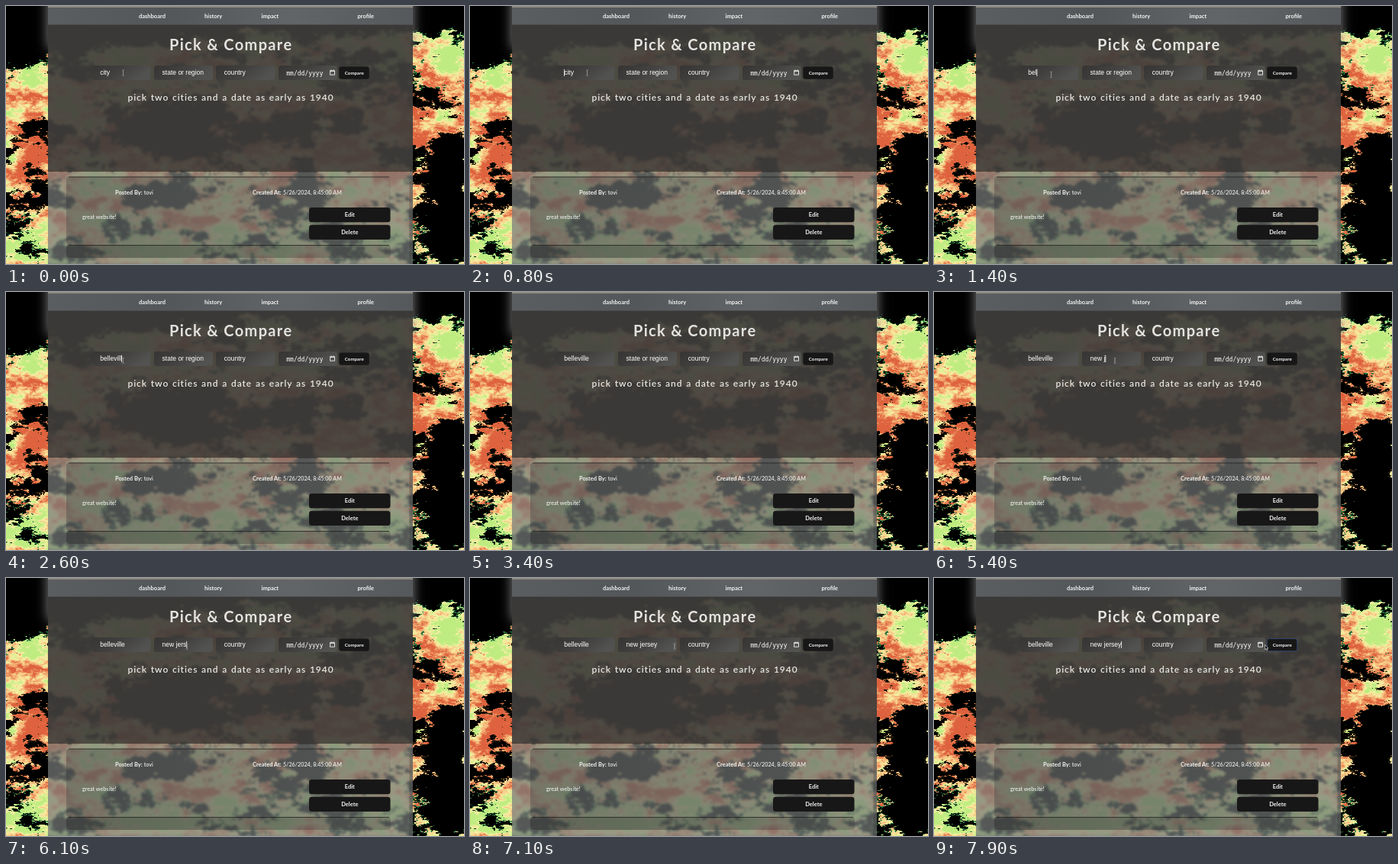
These frames come from a looping animation (600 by 338 pixels, 8000 ms). An HTML page with a canvas:

```html
<!DOCTYPE html>
<html lang="en">
<head>
<meta charset="utf-8">
<title>Pick &amp; Compare</title>
<style>
  html, body { margin: 0; width: 100%; height: 100%; overflow: hidden; background: #000; }
  canvas, svg { position: absolute; left: 0; top: 0; width: 100%; height: 100%; display: block; }
  text { font-family: Lato, sans-serif; font-size: 7.5px; fill: #f3f3f1; white-space: pre; }
  .bold { font-weight: 700; }
  .mid { text-anchor: middle; }
  .title { font-size: 20px; font-weight: 700; letter-spacing: 1.35px; fill: #e4e3df; }
  .lead { font-size: 12px; font-weight: 600; letter-spacing: .95px; word-spacing: .8px; fill: #e9e8e4; }
  .small { font-size: 7.2px; font-weight: 500; }
  .input { font: 8.5px "Liberation Sans", Arial, sans-serif; fill: #fff; }
  .date { font: 8px "DejaVu Sans Mono", monospace; fill: #fff; }
  .field { fill: url(#fieldFill); }
  .button { fill: #181717; }
</style>
</head>
<body>
<canvas id="scene" width="600" height="338"></canvas>
<svg viewBox="0 0 600 338" preserveAspectRatio="none">
  <defs>
    <linearGradient id="fieldFill" x1="0" y1="0" x2="1" y2=".35">
      <stop offset="0" stop-color="#363533"/>
      <stop offset=".5" stop-color="#41403e"/>
      <stop offset="1" stop-color="#525250"/>
    </linearGradient>
  </defs>

  <g class="bold">
    <text x="174" y="16">dashboard</text>
    <text x="260" y="16">history</text>
    <text x="334.5" y="16">impact</text>
    <text x="460.5" y="16">profile</text>
  </g>

  <text class="title mid" x="294.7" y="58.3">Pick &amp; Compare</text>
  <text class="lead mid" x="294.5" y="124.3">pick two cities and a date as early as 1940</text>

  <rect class="field" x="113" y="78" width="76.5" height="19" rx="3"/>
  <rect class="field" x="194" y="78" width="77" height="19" rx="3"/>
  <rect class="field" x="275" y="78" width="77.5" height="19" rx="3"/>
  <rect class="field" x="357" y="78" width="77" height="19" rx="3"/>
  <text class="input" id="city" x="123.2" y="90.4"></text>
  <text class="input" id="state" x="204.6" y="90.4"></text>
  <text class="input" x="285.8" y="90.4">country</text>
  <text class="date" x="367.3" y="90.6">mm/dd/yyyy</text>
  <path d="M424.7 84.8h5.8v5.4h-5.8zM424.2 85.3h6.8M426 83.4v1.4M429.2 83.4v1.4" fill="none" stroke="#f3f3f1" stroke-width=".9"/>
  <rect class="button" id="compare" x="436.3" y="79.5" width="39.5" height="16.2" rx="3"/>
  <text class="bold mid" x="456.3" y="89.7" style="font-size:6.2px">Compare</text>

  <text class="bold" x="143" y="246.6">Posted By:</text>
  <text class="small" x="180.7" y="246.6">tovi</text>
  <text class="bold" x="323" y="246.6">Created At:</text>
  <text class="small" x="363" y="246.6">5/26/2024, 8:45:00 AM</text>
  <text class="small" x="100" y="279">great website!</text>
  <rect class="button" x="397" y="264" width="106.5" height="19.2" rx="3.5"/>
  <rect class="button" x="397" y="286.7" width="106.5" height="19.2" rx="3.5"/>
  <text class="bold mid" x="450.3" y="276.2">Edit</text>
  <text class="bold mid" x="450.3" y="298.9">Delete</text>

  <rect id="caret" y="82.8" width=".8" height="9.2" fill="#fff"/>
  <path id="beam" d="M-1.5-3.8Q0-3.8 0-2.6V2.6Q0 3.8-1.5 3.8M1.5-3.8Q0-3.8 0-2.6V2.6Q0 3.8 1.5 3.8" fill="none" stroke="#9a9894" stroke-width=".7"/>
  <path id="arrow" d="M0 0V6.2L1.4 4.9 2.4 7.1 3.4 6.6 2.5 4.5H4.3Z" fill="#000" stroke="#fff" stroke-width=".6"/>
</svg>
<script>
const $ = id => document.getElementById(id);
const LOOP = 8000;
const clamp = v => Math.min(1, Math.max(0, v));
const smooth = t => t * t * (3 - 2 * t);
const mix = (a, b, k) => a + (b - a) * k;

/* ---------- backdrop ---------- */
const hash = (x, y, seed) => {
  let h = Math.imul(x, 374761393) ^ Math.imul(y, 668265263) ^ Math.imul(seed, 974634777);
  h = Math.imul(h ^ (h >>> 13), 1274126177);
  return ((h ^ (h >>> 16)) >>> 0) / 4294967296;
};

function noise(x, y, seed) {
  const ix = Math.floor(x), iy = Math.floor(y), u = smooth(x - ix), v = smooth(y - iy);
  return mix(mix(hash(ix, iy, seed), hash(ix + 1, iy, seed), u),
             mix(hash(ix, iy + 1, seed), hash(ix + 1, iy + 1, seed), u), v);
}
function fractal(x, y, seed) {
  let sum = 0, amp = 1, total = 0;
  for (let i = 0; i < 6; i++) {
    sum += amp * noise(x, y, seed + i);
    total += amp;
    amp *= .75; x *= 2; y *= 2;
  }
  return sum / total;
}

// dark waters: centre and radii
const lakes = [[582, 205, 27, 38], [235, 165, 85, 42], [200, 248, 45, 18], [95, 85, 38, 14], [580, 300, 28, 40]];
const water = (x, y) => lakes.reduce((sum, [cx, cy, rx, ry]) =>
  sum + .3 * Math.exp(-((((x - cx) / rx) ** 2 + ((y - cy) / ry) ** 2) ** 2)), 0);

// cool lowlands to hot deserts
const ramp = [[190, 236, 128], [246, 240, 164], [246, 186, 122], [222, 98, 62]];

function mapColor(x, y) {
  const coast = mix(90, 48, clamp(x / 300));
  const depth = fractal(x / 56, y / 32, 11) - water(x, y) - .42 - Math.max(0, coast - y) * .012;
  if (depth < -.012) return [0, 0, 0];
  if (depth < .01) return y < 110 || y > 270 ? [46, 120, 66] : [62, 46, 24];
  const heat = fractal(x / 36, y / 20, 41) + .08 * Math.sin(Math.PI * (y - 75) / 200);
  const k = clamp((heat - .38) / .3) * 2.999, i = Math.floor(k);
  return ramp[i].map((c, n) => mix(c, ramp[i + 1][n], k - i));
}

function drawScene() {
  const ctx = $("scene").getContext("2d");
  const map = document.createElement("canvas");
  map.width = 600; map.height = 338;
  const mapCtx = map.getContext("2d"), image = mapCtx.createImageData(600, 338);
  for (let y = 0, i = 0; y < 338; y++)
    for (let x = 0; x < 600; x++, i += 4)
      image.data.set([...mapColor(x, y), 255], i);
  mapCtx.putImageData(image, 0, 0);
  ctx.drawImage(map, 0, 0);

  const box = (x, y, w, h, fill) => { ctx.fillStyle = fill; ctx.fillRect(x, y, w, h); };
  const gradient = (x0, y0, x1, y1, ...colors) => {
    const g = ctx.createLinearGradient(x0, y0, x1, y1);
    colors.forEach((c, i) => g.addColorStop(i / (colors.length - 1), c));
    return g;
  };
  const frosted = (y, h, fill, alpha) => {
    box(55, y, 478, h, fill);
    ctx.save();
    ctx.beginPath(); ctx.rect(55, y, 478, h); ctx.clip();
    ctx.globalAlpha = alpha;
    ctx.filter = "blur(1.8px)";
    ctx.drawImage(map, 0, 0);
    ctx.restore();
  };

  // soft halo around the header
  ctx.save();
  ctx.shadowColor = "rgba(175,175,175,.75)";
  ctx.shadowBlur = 15;
  box(55, -20, 478, 76, "#444");
  ctx.restore();

  frosted(25, 192.5, "#403e3c", .075);
  frosted(217.5, 120.5, "#767a79", .28);

  box(55, 0, 478, 25, gradient(55, 0, 533, 25, "#5b5e60", "#53575a", "#626567", "#56595c"));
  box(55, 0, 478, 2, "#8c8a80");
  box(55, 24, 478, 1, "#4a4b4b");

  const card = (y, h, fill) => {
    ctx.beginPath(); ctx.roundRect(79, y, 425, h, 4);
    ctx.fillStyle = fill; ctx.fill();
    box(82, y, 420, 1, "rgba(30,30,28,.75)");
  };
  card(223.5, 89.5, gradient(79, 0, 504, 0, "rgba(45,47,48,.32)", "rgba(45,47,48,.08)"));
  card(313, 17, gradient(79, 0, 504, 0, "rgba(45,47,45,.5)", "rgba(45,47,45,.25)"));
  box(528.5, 230, 4.5, 108, "rgba(50,52,52,.3)");
}

/* ---------- interaction ---------- */
const inputs = [
  { node: $("city"), hint: "city", word: "belleville", focus: 500, blur: 4500, start: 1000, pace: 190 },
  { node: $("state"), hint: "state or region", word: "new jersey", focus: 4500, blur: LOOP, start: 4600, pace: 200 }
];

const show = (node, on) => node.setAttribute("visibility", on ? "visible" : "hidden");
const ease = (t, from, to) => smooth(clamp((t - from) / (to - from)));

function render(t) {
  let caretOn = false;
  for (const { node, hint, word, focus, blur, start, pace } of inputs) {
    const count = Math.min(word.length, Math.max(0, Math.floor((t - start) / pace) + 1));
    const value = count ? word.slice(0, count) : hint;
    if (node.textContent !== value) node.textContent = value;
    if (t < focus || t >= blur) continue;
    const lastInput = count ? start + (count - 1) * pace : focus;
    caretOn = (t - lastInput) % 1000 < 550;
    const width = count ? node.getComputedTextLength() : 0;
    $("caret").setAttribute("x", +node.getAttribute("x") + width);
  }
  show($("caret"), caretOn);

  const x = 153.5 + 83.5 * ease(t, 3500, 4100) + 196.7 * ease(t, 6900, 7700);
  const y = 87.5 + 2.3 * (ease(t, 800, 1000) - ease(t, 6900, 7700));
  const overDate = x > 357;
  for (const id of ["beam", "arrow"]) $(id).setAttribute("transform", `translate(${x} ${y})`);
  show($("beam"), !overDate && !(t >= 2700 && t < 3500));
  show($("arrow"), overDate);
  $("compare").setAttribute("stroke", t >= 7800 ? "#34446e" : "none");
}

drawScene();
(function tick() {
  render(performance.now() % LOOP);
  requestAnimationFrame(tick);
})();
</script>
</body>
</html>
```
